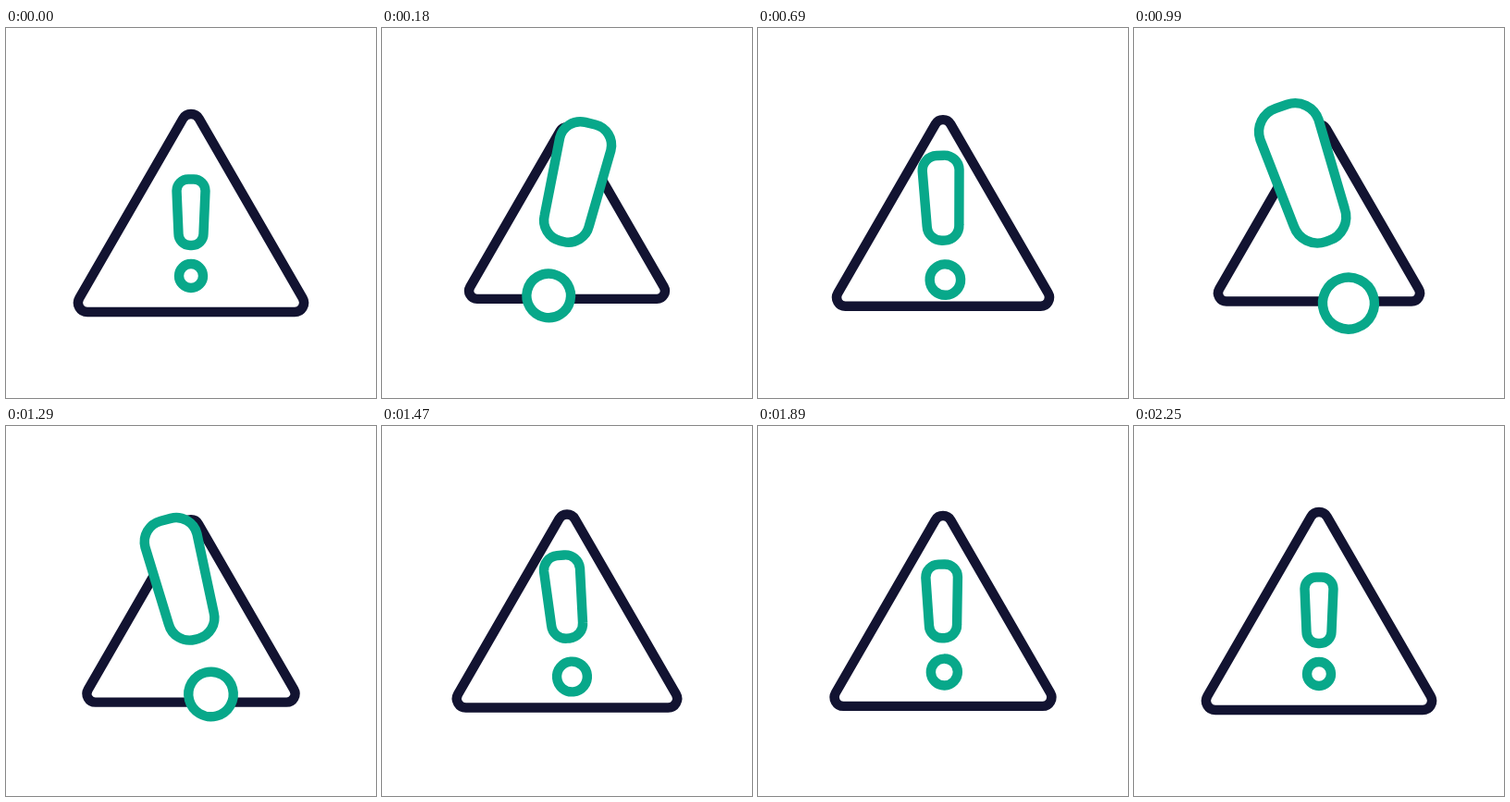
These frames come from a looping animation (400 px wide and 400 px high, 2.28 s). An HTML page:

```html
<!DOCTYPE html>
<html lang="en">
<head>
<meta charset="utf-8">
<title>Warning sign</title>
<style>
  html, body { margin: 0; width: 100%; height: 100%; overflow: hidden; background: #fff; }
  svg { display: block; width: 100%; height: 100%; }
  path, circle { fill: #fff; stroke-width: 10.4; vector-effect: non-scaling-stroke; }
  #triangle { stroke: #121331; }
  #mark { stroke: #08a88a; }
</style>
</head>
<body>
<svg viewBox="0 0 400 400">
  <g id="triangle">
    <path d="M79.3 292 L191.3 98 A10 10 0 0 1 208.7 98 L320.7 292 A10 10 0 0 1 312 307 H88 A10 10 0 0 1 79.3 292 Z"/>
  </g>
  <!-- drawn around its own centre -->
  <g id="mark">
    <path d="M-15.5 -46 A12.5 12.5 0 0 1 -3 -58.5 H3 A12.5 12.5 0 0 1 15.5 -46 L13.5 .5 A12.5 12.5 0 0 1 1 13 H-1 A12.5 12.5 0 0 1 -13.5 .5 Z"/>
    <circle cy="46" r="13"/>
  </g>
</svg>
<script>
  const LOOP = 2280, STEP = 30;
  const triangle = document.getElementById('triangle');
  const mark = document.getElementById('mark');

  // 0 at both ends of the loop, 1 in between
  function activity(t) {
    const u = Math.max(0, Math.min(1, t / 200, (LOOP - STEP - t) / 200));
    return u * u * (3 - 2 * u);
  }

  // bell-shaped swell around a moment
  const swell = (t, peak, width) => activity(t) * Math.exp(-(((t - peak) / width) ** 2) / 2);

  // swing that dies out after the second beat
  function rebound(t) {
    const since = t - 1540, life = 700;
    if (since < 0 || since > life) return 0;
    return .19 * (1 - since / life) ** 2 * Math.sin(Math.PI * since / 270);
  }

  function pose(t) {
    const right = swell(t, 330, 160), left = swell(t, 1100, 205);
    const active = activity(t), bounce = rebound(t);
    const grow = 1.33 * (right + left) - 3 * bounce;
    return {
      base: 1 - .15 * swell(t, 290, 250) - .12 * left + bounce,
      size: 1 + grow,
      tilt: 24 * right - 20 * left - 1.5 * active,
      y: 222 - 6 * active - 10.5 * grow
    };
  }

  const start = performance.now();

  function draw() {
    const now = (performance.now() - start) % LOOP;
    const { base, size, tilt, y } = pose(Math.floor(now / STEP) * STEP);
    triangle.setAttribute('transform', `translate(200 200) scale(${base}) translate(-200 -200)`);
    mark.setAttribute('transform', `translate(200 ${y}) rotate(${tilt}) scale(${size})`);
    requestAnimationFrame(draw);
  }
  draw();
</script>
</body>
</html>
```
